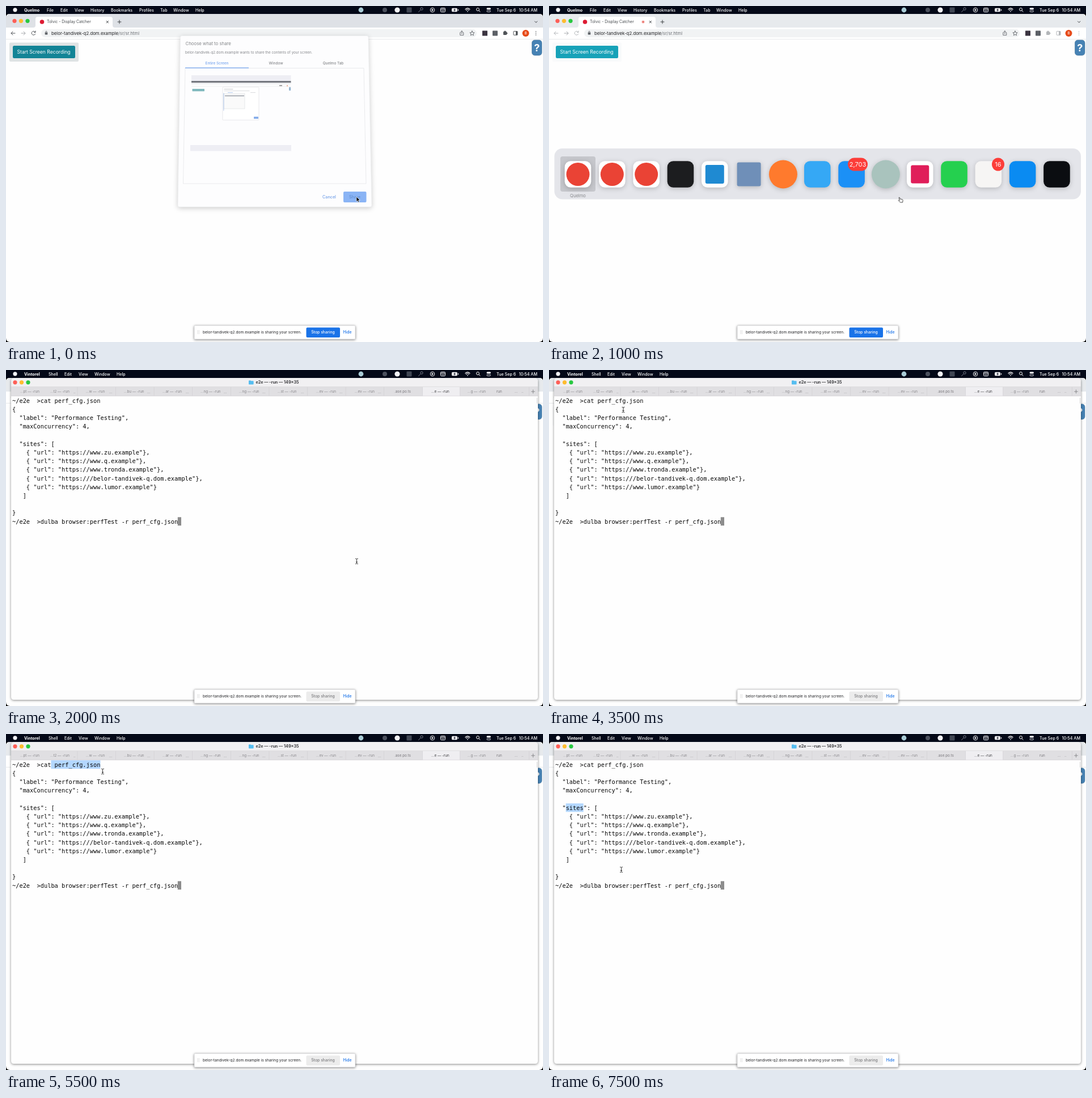
An HTML page for the animation above (8000 ms loop, 947x592 px).

```html
<!DOCTYPE html>
<html lang="en">
<head>
<meta charset="utf-8">
<title>Screen sharing demo</title>
<style>
html, body { margin: 0; width: 100%; height: 100%; overflow: hidden; background: #000; }
svg { display: block; }
text { font-family: Inter, "Open Sans", sans-serif; white-space: pre; }
.mono text { font-family: "DejaVu Sans Mono", monospace; }
.shadow { filter: drop-shadow(0 1px 2px #0007); }
.soft { filter: drop-shadow(0 2px 4px #0003); }
.line { fill: none; stroke-linecap: round; }
</style>
</head>
<body>
<svg id="stage" width="947" height="592" viewBox="0 0 947 592"></svg>
<script>
const HOST = 'belor-tandivek-q2.dom.example';
const BROWSER = 'Quelmo', CONSOLE = 'Vintorel';

// y is the vertical middle of the text
const text = (x, y, s, size, fill, more = '') =>
  `<text x="${x}" y="${y + size * .36}" font-size="${size}" fill="${fill}" ${more}>${s}</text>`;
const mid = (x, y, s, size, fill, more = '') => text(x, y, s, size, fill, 'text-anchor="middle" ' + more);
const box = (x, y, w, h, fill, r = 0, more = '') =>
  `<rect x="${x}" y="${y}" width="${w}" height="${h}" rx="${r}" fill="${fill}" ${more}/>`;
const dot = (x, y, r, fill, more = '') => `<circle cx="${x}" cy="${y}" r="${r}" fill="${fill}" ${more}/>`;
const line = (d, color, w = 1) => `<path class="line" d="${d}" stroke="${color}" stroke-width="${w}"/>`;
const group = (id, content) => `<g id="${id}">${content}</g>`;
const lights = (x, y) => ['#fe5f57', '#febc2e', '#28c840'].map((c, i) => dot(x + i * 11.5, y, 3.6, c)).join('');
const BOLD = 'font-weight="700"', MEDIUM = 'font-weight="500"';

function menu(id, name, items) {
  return group(id, text(32, 7, name, 7.2, '#fff', BOLD) +
    items.map(([x, s]) => text(x, 7, s, 7.1, '#fff', MEDIUM)).join(''));
}

function menuBar() {
  const w = '#f2f2f5';
  return box(0, 0, 947, 14, '#040918') + dot(16, 6.8, 3.6, w) +
    menu('webMenu', BROWSER, [[72, 'File'], [96, 'Edit'], [121, 'View'], [149, 'History'], [185, 'Bookmarks'],
      [235, 'Profiles'], [272, 'Tab'], [295, 'Window'], [334, 'Help']]) +
    menu('shellMenu', CONSOLE, [[75, 'Shell'], [103, 'Edit'], [128, 'View'], [156, 'Window'], [195, 'Help']]) +
    dot(626, 7, 4.4, '#a9cbd6') + dot(668, 7, 4, '#4b505d') + dot(690, 7, 4.6, w) +
    box(706.5, 2.5, 9, 9, '#414754', 1) +
    dot(733, 5, 2.2, 'none', 'stroke="#777c88"') + line('M731 7l-3.5 3.5', '#777c88') +
    dot(752, 7, 3.8, 'none', `stroke="${w}"`) + `<path d="M750.7 4.8v4.4l3.6-2.2z" fill="${w}"/>` +
    box(766.5, 3.5, 8, 7, 'none', 1, `stroke="${w}"`) + line('M767 5.5h7M768 8h5', w) +
    box(786, 3.8, 10, 6.4, w, 1.6) + box(797, 5.6, 1.2, 3, w, .5) +
    '<path d="M791.8 4l-2.6 3.5h1.8l-.8 2.8 2.8-3.7h-1.8z" fill="#040918"/>' +
    line('M810 5.8q4-3.6 8 0M811.4 7.6q2.6-2.2 5.2 0', w, 1.2) + dot(814, 9.6, .9, w) +
    dot(832, 6, 2.5, 'none', `stroke="${w}"`) + line('M834 8l2 2.2', w) +
    box(847.5, 3.3, 7.5, 3, w, 1.5) + box(848, 7.8, 6.5, 2.6, 'none', 1.3, `stroke="${w}" stroke-width=".8"`) +
    text(865, 7, 'Tue Sep 6', 7.2, '#fff', MEDIUM) +
    text(937, 7, '10:54 AM', 7.2, '#fff', MEDIUM + ' text-anchor="end"');
}

function browser() {
  const g = '#5f6368', ink = 'currentColor';
  const nav = line('M16 48H9M12 45l-3 3 3 3', ink) + line('M27 48h7M31 45l3 3-3 3', '#a5a8ac') +
    line('M51.5 46a3.4 3.4 0 1 0 .2 3.2M52 44v2.4h-2.4', ink) +
    box(877, 45, 6, 6, ink, 1) + dot(880, 45, 1.5, ink) + dot(883, 48, 1.5, ink) +
    box(895, 44.6, 7, 6.6, 'none', .6, `stroke="${ink}"`) + box(899, 44.6, 3, 6.6, ink) +
    [45, 48, 51].map(y => dot(934.5, y, .8, ink)).join('');
  return '<path d="M0 20q0-6 6-6h935q6 0 6 6v565q0 7-7 7H7q-7 0-7-7z" fill="#fefefe"/>' +
    '<path id="strip" d="M0 20q0-6 6-6h935q6 0 6 6v18H0z"/>' +
    '<path d="M48 38q4 0 4-4v-11q0-4 4-4h128q4 0 4 4v11q0 4 4 4z" fill="#fff"/>' +
    lights(15, 26.3) + dot(63.5, 28, 3.8, '#dd1b33') +
    text(72, 28, 'Tolvic - Display Catcher', 6.9, '#45494d') +
    group('recDot', dot(166, 28, 2.8, '#f9c5c2') + dot(166, 28, 1.5, '#e65f58')) +
    line('M177 26.3l3.6 3.6M180.6 26.3l-3.6 3.6', '#3c4043') +
    line('M197 28h6M200 25v6', '#3c4043') + line('M932.5 27l2.2 2.2 2.2-2.2', '#3c4043') +
    box(0, 38, 947, 20.5, '#fff') + box(0, 58, 947, .7, '#dfe1e4') +
    box(62, 40.8, 768, 14.4, '#f1f3f4', 7.2) +
    box(68.7, 46.6, 4.6, 4, g, .6) + line('M69.8 46.5v-1a1.2 1.2 0 0 1 2.4 0v1', g, .8) +
    text(80, 48, `${HOST}<tspan fill="#6d7176">/sr/sr.html</tspan>`, 7.8, '#202124') +
    line('M801.8 46.8h-1v4.6h6v-4.6h-1M803.8 49v-5M802.2 45.4l1.6-1.6 1.6 1.6', g, .9) +
    line('M822 44l1.2 2.7 2.9.3-2.2 1.9.7 2.9-2.6-1.5-2.6 1.5.7-2.9-2.2-1.9 2.9-.3z', g, .9) +
    box(840, 43.5, 9, 9, '#3b3440', .5) + box(858, 43.5, 9, 9, '#5c6066', .8) +
    group('nav', nav) + dot(916.5, 48, 6, '#e64a19') + mid(916.5, 48, 'B', 6.4, '#fff') +
    box(6, 64.5, 122, 33.5, '#fff', 2, 'id="pad"') + box(12, 70, 110, 22, '#fff', 2.5, 'id="start"') +
    mid(66.6, 81.3, 'Start Screen Recording', 8.6, '#fff') +
    box(927.5, 60, 17.5, 27, '#4682b4', 5, 'stroke="#3d6d96" stroke-width=".6"') +
    mid(936.3, 73.5, '?', 18, '#fff', BOLD);
}

function dialog() {
  const grey = '#85878a', blue = '#76a5ee';
  const thumb = box(327, 122, 175.5, 10, '#eeeef4') + box(327, 132, 175.5, 3.3, '#74777e') +
    box(327, 135.3, 175.5, 2.5, '#eeeff1') + box(327, 141.5, 175.5, .6, '#e4e5e7') +
    box(482, 139.5, 5, 1.6, '#888') + box(495, 139.5, 2, 2, '#e9a58b') +
    box(328.5, 146, 21.5, 4.2, '#7fb8bd', .6) + box(499, 143, 3.2, 6, '#94b5d1', .8) +
    box(382, 143, 64, 58, '#fff', 1, 'stroke="#dedfe2" stroke-width=".7"') +
    box(384.5, 146, 16, 1, '#c5c7ca') + box(384.5, 149, 45, .8, '#d1d3d6') +
    box(391, 152, 9, .8, '#a8c5f1') + box(431, 152, 9, .8, '#d1d3d6') +
    box(384, 154, 37, 27, '#fafafa', 0, 'stroke="#d8d9dd" stroke-width=".6"') +
    box(386, 157, 34, 2.4, '#b9bcc2') + box(383.5, 153.5, .8, 31, '#9bb8e6') +
    box(437, 195, 8, 3.8, '#86adea', .6) + box(325, 245, 178, 10.5, '#eeeef4');
  return '<path class="soft" d="M311 52.5H636q3 0 3 3L645 351q0 3-3 3H306q-3 0-3-3L307.5 55.5q0-3 3-3z" fill="#fdfdfe" stroke="#eceef0" stroke-width=".7"/>' +
    text(316.5, 66.3, 'Choose what to share', 7.8, grey) +
    text(316, 82, `${HOST} wants to share the contents of your screen.`, 6.25, grey) +
    mid(372, 101, 'Entire Screen', 6.4, blue, MEDIUM) + mid(476, 101, 'Window', 6.4, grey, MEDIUM) +
    mid(577, 101, BROWSER + ' Tab', 6.4, grey, MEDIUM) +
    line('M316 109.5H631L635 313H312.5L316 110', '#e1e3e6', .7) + box(316, 108.4, 112, 1.3, blue) + thumb +
    mid(570, 336.3, 'Cancel', 7.2, '#719fe8', MEDIUM) + box(595, 327, 40.5, 19, '#8ab4f5', 2) +
    mid(615, 336.3, 'Share', 7.2, '#648fcf', MEDIUM);
}

const iconX = i => 51 + i * 60.32;

function switcher() {
  const y = 296.5;
  const square = (i, s, fill, r = 3) => box(iconX(i) - s / 2, y - s / 2, s, s, fill, r);
  const tile = (i, fill) => square(i, 46.6, fill, 10.5);
  const round = (i, r, fill) => dot(iconX(i), y, r, fill);
  const badge = (x, w, s) => box(x - w / 2, 267.5, w, 23, '#fc3d39', 11.5) + mid(x, 279, s, 11, '#fff');
  const icons = [0, 1, 2].map(i => tile(i, '#fff') + round(i, 20.5, '#ea4335')).join('') +
    tile(3, '#1c1d1f') + tile(4, '#fff') + square(4, 33, '#1f8ad2') +
    square(5, 42, '#6f8fb8') + round(6, 25, '#ff7a2d') + tile(7, '#35a8f5') + tile(8, '#1b90f6') +
    round(9, 25, '#a9c3bd') + tile(10, '#fff') + square(10, 32, '#e01e5a') + tile(11, '#25d04f') +
    tile(12, '#f6f5f4') + tile(13, '#0a8bf2') + tile(14, '#0b0d11');
  return box(9.5, 251, 928.5, 89.5, '#e4e5ea', 14) + box(0, 265, 62, 62, '#c6c7cc', 4, 'id="pick"') +
    mid(0, 334.5, '', 7.6, '#88898d', 'id="pickName"') + `<g class="soft">${icons}</g>` +
    badge(544.5, 35, '2,703') + badge(792, 22, '16');
}

function shellWindow() {
  const tabs = [[25, 'pt'], [78, 't2', '..'], [141, 'w', '...'], [208, 'bu', '...'], [276, 'ar', '...'], [343, 'ng', '...'],
    [411, 'ng', '...'], [479, 'st', '...'], [547, 'ev', '...'], [615, 'ev', '...'], [750, 'e'], [814, 'g']];
  const extras = [[685, '.ase.po.ts'], [865, 'run'], [897, '...'], [909, '..']];
  const site = (url, end = ',') => `    { "url": "https://${url}"}${end}`;
  const rows = ['~/e2e  >cat perf_cfg.json', '{', '  "label": "Performance Testing",', '  "maxConcurrency": 4,', '',
    '  "sites": [', site('www.zu.example'), site('www.q.example'), site('www.tronda.example'),
    site('/belor-tandivek-q.dom.example'), site('www.lumor.example', ''), '   ]', '', '}',
    '~/e2e  >dulba browser:perfTest -r perf_cfg.json'];
  const dividers = [...Array(10)].map((_, i) => 734 - 67.6 * i).concat(800.5, 922);
  return '<path class="shadow" d="M9 20q0-6 6-6h917q6 0 6 6v556q0 5-5 5H14q-5 0-5-5z" fill="#fefefe"/>' +
    '<path d="M9 20q0-6 6-6h917q6 0 6 6v10H9z" fill="#f1f0f2"/>' + box(9, 29.5, 929, 16.5, '#e0dfe2') +
    box(734.5, 29.5, 66, 16.5, '#efeef1') + box(9, 45.6, 929, .6, '#cfced2') + box(9, 29.4, 929, .5, '#d3d2d5') +
    dividers.map(x => box(x, 30, .6, 15.5, '#cfced2')).join('') + lights(16, 21.8) +
    box(428, 18.5, 4, 2, '#4fb4e6', .8) + box(428, 19.3, 8.6, 6.2, '#55bdf0', .9) +
    mid(478.5, 21.8, 'e2e — -run — 149×35', 7.2, '#3f3f42', BOLD) +
    tabs.map(([x, s, tail]) => text(x, 38, `...${s} — -run`, 6.3, s === 'e' ? '#3a3a3d' : '#89888c') +
      (tail ? text(x + 41, 39, tail, 6.3, '#77767a') : '')).join('') +
    extras.map(([x, s]) => text(x, 38, s, 6.3, '#77767a')).join('') +
    line('M926.5 38h6M929.5 35v6', '#77767a', .8) + box(936, 49, .8, 10, '#c9c9cc') +
    box(79.4, 46.3, 87, 15, '#b3d7ff', 0, 'id="selFile"') + box(29.7, 122.3, 31, 15, '#b3d7ff', 0, 'id="selSites"') +
    box(302.8, 259.3, 6.2, 14.8, '#8c8c8c') +
    `<g class="mono">${rows.map((s, i) => text(11, 54 + i * 15.21, s, 10.33, '#080808')).join('')}</g>`;
}

function shareBar() {
  return box(332, 563, 284, 24, '#fff', 1.5, 'class="shadow" stroke="#c6c8cb" stroke-width=".6"') +
    [572, 574.5, 577].map(y => dot(338, y, .5, '#999') + dot(340.3, y, .5, '#999')).join('') +
    text(347, 575, HOST + ' is sharing your screen.', 6.66, '#202124') +
    box(529.5, 566.5, 59.5, 17.5, '#fff', 2, 'id="stop"') +
    mid(559, 575, 'Stop sharing', 6.9, '#fff', MEDIUM + ' id="stopText"') +
    mid(602, 575, 'Hide', 6.9, '#1a73e8', MEDIUM);
}

function cursors() {
  return group('arrow', '<path d="M0 0v8.8l2-1.9 1.4 3.2 1.5-.7-1.4-3.1h2.8z" fill="#000" stroke="#fff" stroke-width=".7"/>') +
    group('hand', '<path d="M-2.5-4.5q1-.8 1.6.3l1 2.4 3 .4q1.6.4 1.5 2l-.5 3.4h-4.2l-3.2-3.4q.3-1 1.5-.5l.7.5z" fill="#fff" stroke="#222" stroke-width=".8"/>') +
    group('beam', line('M-2-4.7q2 0 2 1.2 0-1.2 2-1.2M0-3.5v7M-2 4.7q2 0 2-1.2 0 1.2 2 1.2M-1.2 1.5h2.4', '#222', .9));
}

document.getElementById('stage').innerHTML = group('web', browser()) + group('dialog', dialog()) +
  group('switcher', switcher()) + group('shell', shellWindow()) + menuBar() + shareBar() + cursors();

const $ = id => document.getElementById(id);
const show = (id, on) => $(id).style.display = on ? '' : 'none';
const STEP = 500;

// One pose per step: cursor, x, y, extra state (a number is the picked icon)
const poses = [
  ['arrow', 618, 336, 'dialog'], ['arrow', 618, 336], ['hand', 619.5, 342, 0], ['hand', 619.5, 342, 3],
  ['beam', 618.5, 337], ['beam', 618.5, 337], ['beam', 187, 147], ['beam', 131, 70],
  ['beam', 120, 155], ['beam', 84, 60], ['beam', 168, 60, 'selFile'], ['beam', 170.5, 66, 'selFile'],
  ['beam', 77, 158], ['beam', 43, 131], ['beam', 43, 131, 'selSites'], ['beam', 127.5, 239, 'selSites']
];

function draw(now) {
  const step = Math.floor(now / STEP) % poses.length;
  const [cursor, x, y, state] = poses[step];
  const inShell = cursor === 'beam', picking = cursor === 'hand', asking = state === 'dialog';
  for (const id of ['arrow', 'hand', 'beam']) show(id, id === cursor);
  $(cursor).setAttribute('transform', `translate(${x} ${y})`);
  for (const id of ['dialog', 'selFile', 'selSites']) show(id, state === id);
  show('shell', inShell);
  show('shellMenu', inShell);
  show('webMenu', !inShell);
  show('switcher', picking);
  show('recDot', step > 1);
  if (picking) {
    $('pick').setAttribute('x', iconX(state) - 31);
    $('pickName').setAttribute('x', iconX(state));
    $('pickName').textContent = state ? CONSOLE : BROWSER;
  }
  $('nav').style.color = asking ? '#505458' : '#b4b7ba';
  $('strip').style.fill = asking ? '#dee1e6' : '#e7eaed';
  $('pad').style.fill = step < 2 ? '#dfe3e4' : '#f9fafb';
  $('start').style.fill = step < 2 ? '#138496' : '#17a2b8';
  $('stop').style.fill = inShell ? '#ececec' : '#1a73e8';
  $('stopText').style.fill = inShell ? '#7b7b7e' : '#fff';
}

const start = performance.now();
function tick() {
  draw(performance.now() - start);
  requestAnimationFrame(tick);
}
tick();
</script>
</body>
</html>
```
